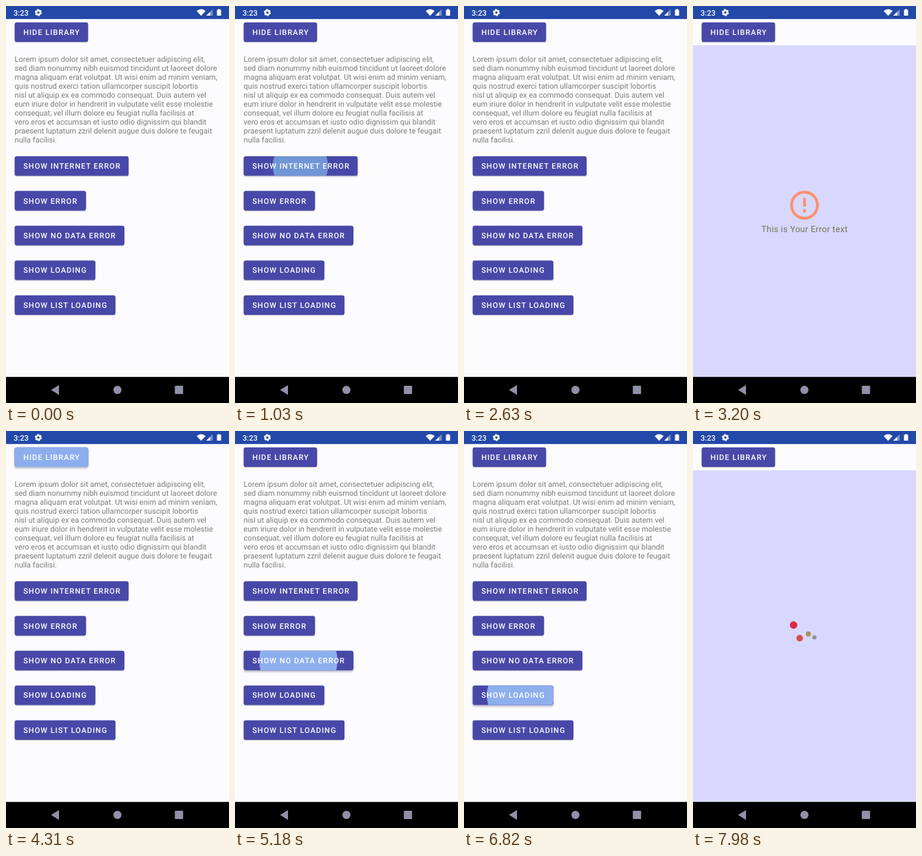
Write an HTML page that moves like this. It is 324 by 576 pixels and loops after 8000 ms.

```html
<!DOCTYPE html>
<html lang="en">
<head>
<meta charset="utf-8">
<title>Library demo</title>
<style>
  html, body { margin: 0; width: 100%; height: 100%; overflow: hidden; background: #fcfcfe; }
  svg { display: block; width: 100%; height: 100%; font-family: Roboto, sans-serif; }
  text { text-rendering: geometricPrecision; }
  .label { font-size: 11.03px; font-weight: 500; letter-spacing: .985px; fill: #fff; }
  .body { font-size: 11.03px; fill: #7c7c7a; }
  .note { font-size: 12.6px; letter-spacing: .25px; fill: #74745c; text-anchor: middle; }
  .icon { fill: #ff9070; }
</style>
</head>
<body>
<svg id="stage" viewBox="0 0 324 576">
  <rect width="324" height="576" fill="#fcfcfe"/>
  <g id="main"></g>
  <g id="top"></g>
  <g id="overlay">
    <rect y="57" width="324" height="482" fill="#d8d8fe"/>
    <g id="views"></g>
    <g id="loader"></g>
  </g>

  <rect width="324" height="18.900" fill="#2248a8"/>
  <text x="11" y="13.600" font-size="11.030" font-weight="500" fill="#fff">3:23</text>
  <g fill="none" stroke="#fff">
    <circle cx="47" cy="9.500" r="3" stroke-width="2.600"/>
    <circle cx="47" cy="9.500" r="4.500" stroke-width="1.300" stroke-dasharray="2.400 2.312"/>
  </g>
  <g fill="#fff">
    <path d="M277 7.300Q283.500 1.500 290 7.300L283.500 14.300Z"/>
    <path d="M291 14H300.300V4.500Z" opacity=".4"/>
    <path d="M291 14H296.500V8.400Z"/>
    <path d="M306.500 5.500H308V4.500H311V5.500H312.500V14H306.500Z"/>
  </g>

  <rect y="538.200" width="324" height="37.800" fill="#000"/>
  <g fill="#9090a8">
    <path d="M65.500 557L77 550V564.200Z"/>
    <circle cx="161.900" cy="557" r="5.900"/>
    <rect x="245.300" y="551" width="12" height="12" rx="1"/>
  </g>
</svg>
<script>
const $ = id => document.getElementById(id);
const LOOP = 8000, SWITCH = 120, FADE = 250;

function add(parent, tag, attrs, text) {
  const el = document.createElementNS('http://www.w3.org/2000/svg', tag);
  for (const key in attrs) el.setAttribute(key, attrs[key]);
  if (text) el.textContent = text;
  parent.appendChild(el);
  return el;
}
const set = (el, attrs) => { for (const key in attrs) el.setAttribute(key, attrs[key]); };
const clamp = v => Math.min(1, Math.max(0, v));
const mix = (a, b, u) => `rgb(${a.map((v, i) => Math.round(v + (b[i] - v) * u))})`;

// Buttons
const buttons = [
  ['HIDE LIBRARY', 23.7, 106.7],
  ['SHOW INTERNET ERROR', 217.9, 165.6],
  ['SHOW ERROR', 268.3, 103.7],
  ['SHOW NO DATA ERROR', 318.8, 159.5],
  ['SHOW LOADING', 369.2, 117.3],
  ['SHOW LIST LOADING', 419.7, 146.5]
].map(([text, y, width], i) => {
  const g = add(i ? $('main') : $('top'), 'g', {});
  const box = { x: 12.6, y, width, height: 28.4, rx: 3.1 };
  const base = add(g, 'rect', { ...box, fill: '#4848a8' });
  add(add(g, 'clipPath', { id: 'clip' + i }), 'rect', box);
  const ripple = add(add(g, 'g', { 'clip-path': `url(#clip${i})` }), 'circle', { cy: y + 14.2 });
  add(g, 'text', { class: 'label', x: 25.2, y: y + 18.2 }, text);
  return { base, ripple };
});

// Paragraph
[
  'Lorem ipsum dolor sit amet, consectetuer adipiscing elit,',
  'sed diam nonummy nibh euismod tincidunt ut laoreet dolore',
  'magna aliquam erat volutpat. Ut wisi enim ad minim veniam,',
  'quis nostrud exerci tation ullamcorper suscipit lobortis',
  'nisl ut aliquip ex ea commodo consequat. Duis autem vel',
  'eum iriure dolor in hendrerit in vulputate velit esse molestie',
  'consequat, vel illum dolore eu feugiat nulla facilisis at',
  'vero eros et accumsan et iusto odio dignissim qui blandit',
  'praesent luptatum zzril delenit augue duis dolore te feugait',
  'nulla facilisi.'
].forEach((line, i) => add($('main'), 'text', { class: 'body', x: 12.6, y: 81.2 + i * 12.93 }, line));

// Message views, icons on a 24 unit grid
const ring = 'M12 2a10 10 0 1 0 0 20a10 10 0 1 0 0-20zm0 2a8 8 0 1 1 0 16a8 8 0 1 1 0-16z';
const eye = x => `M${x - 1.5} 9.5a1.5 1.5 0 1 0 3 0a1.5 1.5 0 1 0-3 0z`;
const cloud = 'M19.35 10.04C18.67 6.59 15.64 4 12 4c-1.48 0-2.85.43-4.01 1.17l1.46 1.46' +
  'C10.21 6.23 11.08 6 12 6c3.04 0 5.5 2.46 5.5 5.5v.5H19c1.66 0 3 1.34 3 3 0 1.13-.64 2.11-1.56 2.62' +
  'l1.45 1.45C23.16 18.16 24 16.68 24 15c0-2.64-2.05-4.78-4.65-4.96zM3 5.27l2.75 2.74' +
  'C2.56 8.15 0 10.77 0 14c0 3.31 2.69 6 6 6h11.73l2 2L21 20.73 4.27 4 3 5.27z' +
  'M7.73 10l8 8H6c-2.21 0-4-1.79-4-4s1.79-4 4-4h1.73z';
const views = [
  ['Check Internet Connection', cloud],
  ['This is Your Error text', ring + 'M11 15h2v2h-2zM11 7h2v6h-2z'],
  ['No Data Available', ring + eye(8.5) + eye(15.5) + 'M9 14h6v1.5H9z']
].map(([text, d]) => {
  const g = add($('views'), 'g', {});
  add(g, 'path', { class: 'icon', d, 'fill-rule': 'evenodd', transform: 'translate(136.8 263.8) scale(2.1)' });
  add(g, 'text', { class: 'note', x: 162, y: 327.6 }, text);
  return g;
});

// Taps: time, button, touch x; button n opens view n, 0 closes it
const taps = [
  [990, 1, 95], [2260, 0, 70], [3080, 2, 65], [4190, 0, 70],
  [5090, 3, 92], [5960, 0, 75], [6740, 4, 82]
];

function drawButtons(t) {
  buttons.forEach(({ base, ripple }, i) => {
    const tap = taps.find(([at, n]) => n === i && t >= at && t < at + SWITCH + FADE);
    let lift = 0;
    if (tap) {
      const age = t - tap[0];
      const show = 1 - clamp((age - SWITCH) / FADE);
      lift = clamp(age / 80) * show;
      set(ripple, {
        cx: tap[2],
        r: 32 + age * .2 + Math.max(0, age - 80) * .6,
        fill: mix([72, 114, 178], [142, 175, 238], clamp(age / 70)),
        opacity: show
      });
    } else {
      set(ripple, { r: 0 });
    }
    base.style.filter = `drop-shadow(0 ${1 + lift * 1.8}px ${.6 + lift}px rgba(50,50,90,.36))`;
  });
}

// Four dots chase each other on a tilted, wavy orbit
const shades = [[220, 36, 72], [216, 80, 84], [178, 144, 88], [145, 145, 152]];
const dots = shades.map(() => add($('loader'), 'circle', {}));

function drawLoader(t) {
  const rad = Math.PI / 180, turn = 157 + (t - 7980) * .3;
  dots.map((_, i) => (turn + i * 90) * rad)
    .sort((a, b) => Math.cos(b) - Math.cos(a))
    .forEach((a, i) => {
      const c = Math.cos(a), u = (1 + c) * 1.5, n = Math.min(2, Math.floor(u));
      set(dots[i], {
        cx: 161.3 + 16.4 * c,
        cy: 294 + 9.5 * Math.cos(a + 41.5 * rad) + 3.5 * Math.cos(2 * a - 134 * rad),
        r: 4.25 - 1.3 * c,
        fill: mix(shades[n], shades[n + 1], u - n)
      });
    });
}

function render(t) {
  let view = 0;
  for (const [at, n] of taps) if (t >= at + SWITCH) view = n;
  const show = (el, on) => set(el, { display: on ? 'inline' : 'none' });
  show($('main'), !view);
  show($('overlay'), view);
  views.forEach((g, i) => show(g, view === i + 1));
  show($('loader'), view === 4);
  drawButtons(t);
  drawLoader(t);
}

const start = performance.now();
function tick() {
  render((performance.now() - start) % LOOP);
  requestAnimationFrame(tick);
}
tick();
</script>
</body>
</html>
```
